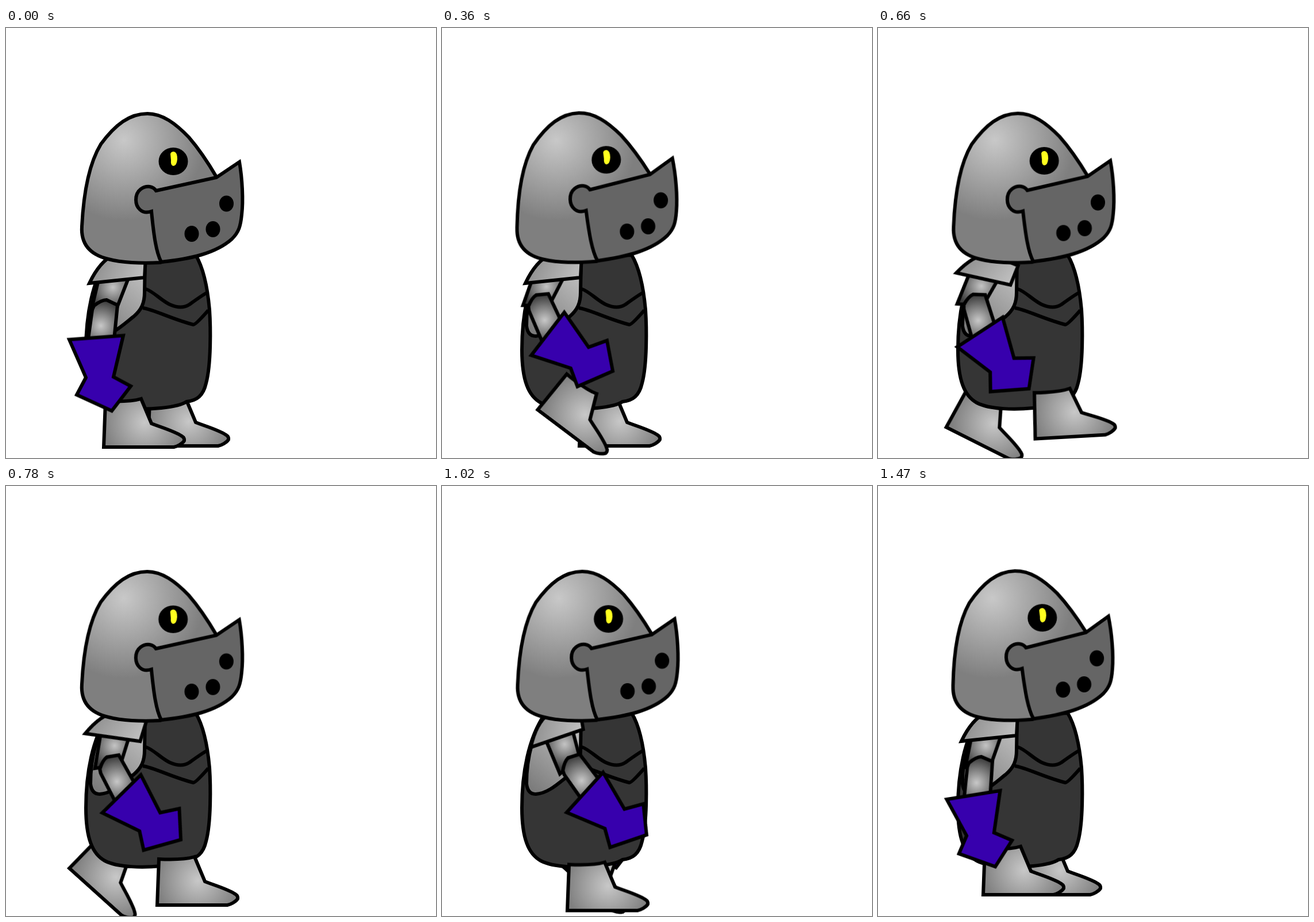
These frames come from a looping animation (748x748 px, 1.65 s). An HTML page:

```html
<!DOCTYPE html>
<html lang="en">
<head>
<meta charset="utf-8">
<title>Walking knight</title>
<style>
html, body { margin: 0; width: 100%; height: 100%; overflow: hidden; background: #fff; }
svg { display: block; width: 100vw; height: 100vh; }
.ink { stroke: #000; stroke-width: 6; }
.line { fill: none; }
.glove { fill: #3700ad; }

/* 55 ticks of 30 ms; steps() keeps every move on that grid */
.move { animation: 1650ms linear infinite; }
#head { transform-origin: 205px 392px; animation-name: head; }
#pauldron { transform-origin: 196px 408px; animation-name: pauldron; }
#upper { transform-origin: 197px 408px; animation-name: upper; }
#fore { animation-name: fore; }
#glove { animation-name: glove; }
#near { animation-name: near; }
#far { animation-name: far; }
#farGlove { animation-name: farGlove; }

@keyframes head {
  0% { transform: rotate(0deg); animation-timing-function: steps(12); }
  21.818% { transform: rotate(-1.85deg); animation-timing-function: steps(6); }
  32.727% { transform: rotate(-1.2deg); animation-timing-function: steps(8); }
  47.273% { transform: rotate(-.1deg); animation-timing-function: steps(8); }
  61.818% { transform: rotate(-.5deg); animation-timing-function: steps(7); }
  74.545% { transform: rotate(-1.45deg); animation-timing-function: steps(8); }
  89.091%, 100% { transform: rotate(-1.85deg); }
}
@keyframes pauldron {
  0% { transform: rotate(0deg); animation-timing-function: steps(12); }
  21.818% { transform: rotate(0deg); animation-timing-function: steps(6); }
  32.727% { transform: rotate(23deg); animation-timing-function: steps(8); }
  47.273% { transform: rotate(14deg); animation-timing-function: steps(8); }
  61.818% { transform: rotate(-13deg); animation-timing-function: steps(7); }
  74.545%, 100% { transform: rotate(0deg); }
}
@keyframes upper {
  0% { transform: rotate(0deg); animation-timing-function: steps(12); }
  21.818% { transform: rotate(6deg); animation-timing-function: steps(6); }
  32.727% { transform: rotate(21deg); animation-timing-function: steps(8); }
  47.273% { transform: rotate(-4deg); animation-timing-function: steps(8); }
  61.818% { transform: rotate(-36deg); animation-timing-function: steps(7); }
  74.545%, 100% { transform: rotate(-2deg); }
}
@keyframes fore {
  0% { transform: translate(172px, 480px) rotate(0deg); animation-timing-function: steps(12); }
  21.818% { transform: translate(165px, 472px) rotate(-31deg); animation-timing-function: steps(6); }
  32.727% { transform: translate(154px, 463px) rotate(-12deg); animation-timing-function: steps(8); }
  47.273% { transform: translate(177px, 479px) rotate(-35deg); animation-timing-function: steps(8); }
  61.818% { transform: translate(222px, 480px) rotate(-43deg); animation-timing-function: steps(7); }
  74.545% { transform: translate(177px, 475px) rotate(-2deg); animation-timing-function: steps(8); }
  89.091%, 100% { transform: translate(177px, 478px) rotate(-2deg); }
}
@keyframes glove {
  0% { transform: translate(157px, 538.5px) rotate(0deg); animation-timing-function: steps(12); }
  21.818% { transform: translate(184px, 532px) rotate(-48.2deg); animation-timing-function: steps(6); }
  32.727% { transform: translate(153.5px, 522.5px) rotate(-17.6deg); animation-timing-function: steps(8); }
  47.273% { transform: translate(201px, 535.5px) rotate(-40.3deg); animation-timing-function: steps(8); }
  61.818% { transform: translate(248.5px, 533px) rotate(-43.5deg); animation-timing-function: steps(7); }
  74.545% { transform: translate(165.5px, 535px) rotate(-5.5deg); animation-timing-function: steps(8); }
  89.091%, 100% { transform: translate(166px, 537.5px) rotate(-5deg); }
}
@keyframes near {
  0% { transform: translate(173px, 649px) rotate(0deg); animation-timing-function: steps(6); }
  10.909% { transform: translate(138px, 612px) rotate(40deg); animation-timing-function: steps(6); }
  21.818% { transform: translate(217px, 602px) rotate(37deg); animation-timing-function: steps(3); }
  27.273% { transform: translate(288px, 620px) rotate(-20deg); animation-timing-function: steps(3); }
  32.727% { transform: translate(278px, 620px) rotate(-6.5deg); animation-timing-function: steps(8); }
  47.273% { transform: translate(266px, 649px) rotate(0deg); animation-timing-function: steps(8); }
  61.818% { transform: translate(221px, 658.5px) rotate(0deg); animation-timing-function: steps(7); }
  74.545% { transform: translate(159.5px, 614px) rotate(26.6deg); animation-timing-function: steps(8); }
  89.091%, 100% { transform: translate(186px, 631px) rotate(0deg); }
}
@keyframes far {
  0% { transform: translate(250px, 647px) rotate(0deg); animation-timing-function: steps(12); }
  21.818% { transform: translate(242px, 647px) rotate(0deg); animation-timing-function: steps(6); }
  32.727% { transform: translate(158px, 649px) rotate(0deg); animation-timing-function: steps(6); }
  43.636% { transform: translate(157px, 612px) rotate(40deg); animation-timing-function: steps(2); }
  47.273% { transform: translate(166px, 607.5px) rotate(42deg); animation-timing-function: steps(8); }
  61.818% { transform: translate(259px, 598px) rotate(42deg); animation-timing-function: steps(2); }
  65.455% { transform: translate(283px, 628px) rotate(-25deg); animation-timing-function: steps(5); }
  74.545% { transform: translate(283px, 632px) rotate(-18.3deg); animation-timing-function: steps(8); }
  89.091%, 100% { transform: translate(250px, 631px) rotate(0deg); }
}
@keyframes farGlove {
  0%, 47.273% { transform: translate(262px, 515px); animation-timing-function: steps(8); }
  61.818% { transform: translate(276px, 536.5px); animation-timing-function: steps(7); }
  74.545%, 100% { transform: translate(262px, 515px); }
}
</style>
</head>
<body>
<svg viewBox="0 0 748 748">
  <defs>
    <radialGradient id="steel" gradientUnits="userSpaceOnUse" cx="205" cy="195" r="140">
      <stop stop-color="#c8c8c8"/><stop offset="1" stop-color="#7f7f7f"/>
    </radialGradient>
    <radialGradient id="bootFill" gradientUnits="userSpaceOnUse" cx="68" cy="37" r="72">
      <stop stop-color="#c8c8c8"/><stop offset="1" stop-color="#808080"/>
    </radialGradient>
    <radialGradient id="upperFill" gradientUnits="userSpaceOnUse" cx="186" cy="451" r="42">
      <stop stop-color="#c4c4c4"/><stop offset="1" stop-color="#3a3a3a"/>
    </radialGradient>
    <radialGradient id="foreFill" gradientUnits="userSpaceOnUse" cx="-7" cy="38" r="44">
      <stop stop-color="#c8c8c8"/><stop offset="1" stop-color="#3a3a3a"/>
    </radialGradient>
    <linearGradient id="plateFill" gradientUnits="userSpaceOnUse" x1="235" y1="430" x2="155" y2="525">
      <stop stop-color="#bcbcbc"/><stop offset="1" stop-color="#7c7c7c"/>
    </linearGradient>
    <linearGradient id="pauldronFill" gradientUnits="userSpaceOnUse" x1="160" y1="405" x2="235" y2="440">
      <stop stop-color="#909090"/><stop offset="1" stop-color="#c0c0c0"/>
    </linearGradient>
    <path id="boot" fill="url(#bootFill)" d="M0 0 L-3 80 H119 C125 79 134 74 137 69 Q138 64 133 61 C120 52 95 45 80 39 L62 -4 Q42 2 0 0Z"/>
    <path id="mitt" d="M-47 3.5 L47 -3.5 L30 68.5 L60 84.5 L27 127.5 L-34 99.5 L-18 69.5Z"/>
  </defs>

  <g class="ink">
    <use href="#mitt" id="farGlove" class="move glove"/>
    <use href="#boot" id="far" class="move"/>

    <g fill="#353535">
      <path d="M178 398 C150 440 139 500 139 560 C139 612 150 640 172 652 C195 664 240 664 270 661 C290 659 305 656 314 650 C332 648 343 640 348 618 C357 585 356 520 354 490 C350 445 342 415 330 395Z"/>
      <path class="line" d="M243 454 C256 458 270 474 285 481 Q305 490 319 481 C330 473 340 466 350 460"/>
      <path class="line" d="M238 487 C258 490 290 507 326 516 Q330 516 352 491"/>
    </g>

    <use href="#boot" id="near" class="move"/>

    <path fill="url(#plateFill)" d="M180 400 C160 425 147 470 147 518 Q149 536 163 536 C185 535 205 515 222 502 C236 490 241 478 241 460 L242 400Z"/>
    <path id="upper" class="move" fill="url(#upperFill)" d="M164 425 L149 488 L194 484 L217 425Z"/>
    <path id="fore" class="move" fill="url(#foreFill)" d="M-22 10 L-19 3 Q-6 -7 3 -7 L22 2 L16 62 L-30 68Z"/>
    <use href="#mitt" id="glove" class="move glove"/>
    <path id="pauldron" class="move" fill="url(#pauldronFill)" d="M145 444 L241 434 L243 398 L188 394 Q163 406 145 444Z"/>

    <g id="head" class="move">
      <path fill="url(#steel)" d="M132 345 C135 285 145 235 165 202 C190 168 215 149 246 149 C272 149 295 166 318 190 C337 212 352 235 366 259 L330 390 L268 408 C235 410 200 408 178 402 C145 394 130 375 132 345Z"/>
      <path fill="#656565" d="M261 283 L366 260 L406 233 C411 262 413 300 410 325 C408 345 405 355 393 367 C365 392 320 402 270 407 C261 390 257 360 253 319 C236 325 226 312 226 299 C226 281 240 275 250 276 Q257 277 261 283Z"/>
      <g stroke="none">
        <ellipse cx="291" cy="232" rx="25.5" ry="24"/>
        <path fill="#ffff1f" d="M286 219 Q287 215 292 215 Q298 216 298 228 Q297 240 291 240 Q286 239 287 230Z"/>
        <ellipse cx="383.5" cy="305.5" rx="12.5" ry="14"/>
        <ellipse cx="323" cy="358" rx="12.5" ry="14"/>
        <ellipse cx="360" cy="350" rx="12.5" ry="14"/>
      </g>
    </g>
  </g>
</svg>
</body>
</html>
```
